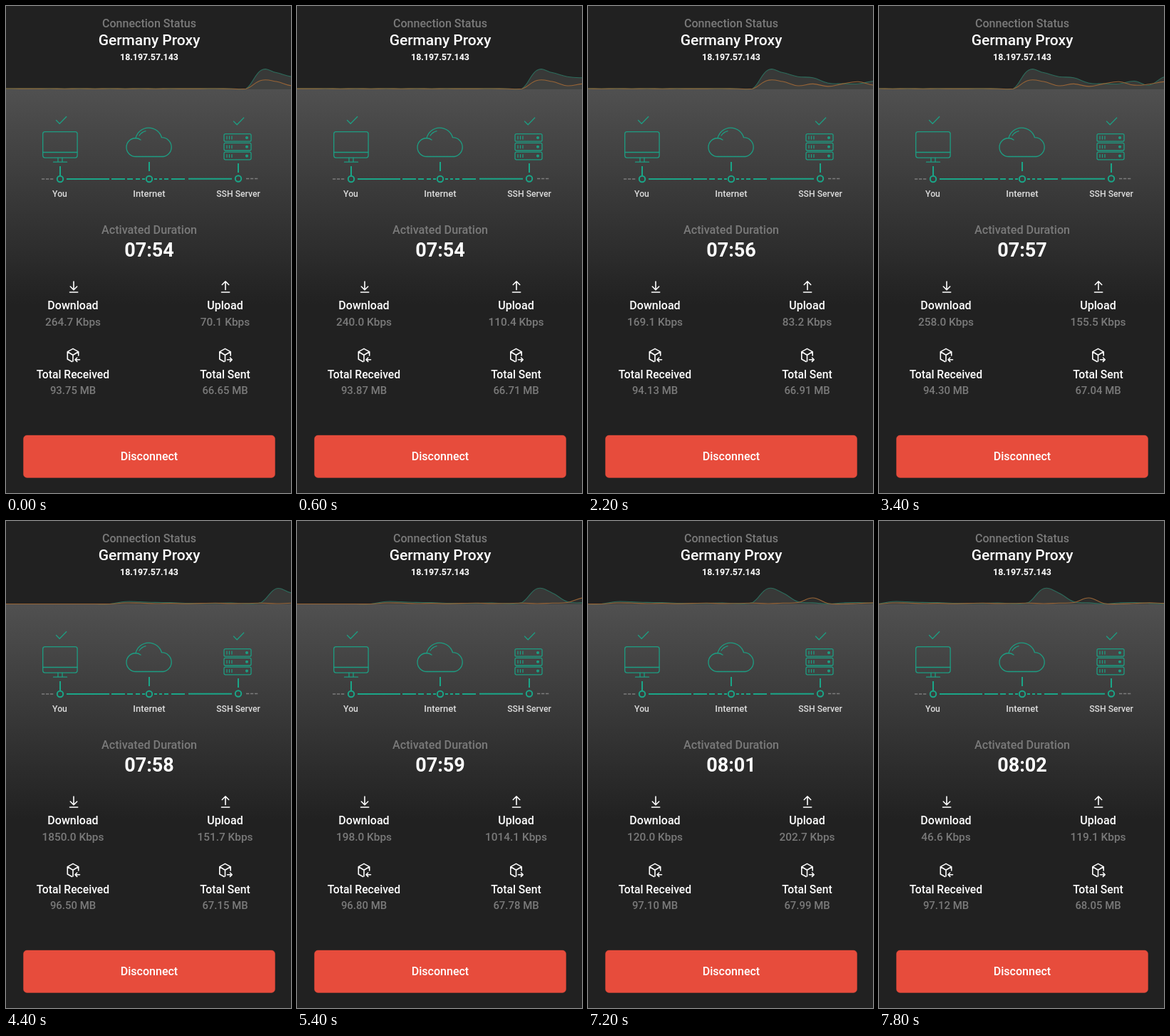
These frames come from a looping animation (400 by 684 pixels, 8000 ms). An HTML page:

```html
<!DOCTYPE html>
<html lang="en">
<head>
<meta charset="utf-8">
<title>Connection status</title>
<style>
  html, body { margin: 0; width: 100%; height: 100%; overflow: hidden; background: #212121; }
  svg { display: block; width: 100%; height: 100%; }
  text { font-family: Roboto, "Open Sans", sans-serif; font-weight: 500; font-size: 16px; text-anchor: middle; fill: #fff; }
  .dim { fill: #7a7a7a; }
  .rate { font-size: 15.4px; }
  .total { font-size: 14.9px; }
  .node { font-size: 12.2px; fill: #dcdcdc; }
  .line { fill: none; stroke-width: 1.1; stroke-linejoin: round; }
  .green { fill: none; stroke: #1d9d82; stroke-width: 1.3; stroke-linecap: round; stroke-linejoin: round; }
  .link { stroke: #1aa688; stroke-width: 2; stroke-linecap: butt; }
  .gap { stroke: #7b7b7b; stroke-width: 1.6; fill: none; }
  .icon { fill: none; stroke: #fff; stroke-width: 1.6; stroke-linecap: round; stroke-linejoin: round; }
</style>
</head>
<body>
<svg viewBox="0 0 400 684" preserveAspectRatio="none">
  <defs>
    <linearGradient id="fade" x1="0" y1="0" x2="0" y2="1">
      <stop offset="0" stop-color="#505050"/>
      <stop offset="1" stop-color="#212121"/>
    </linearGradient>
    <g id="unit">
      <rect x="306" y="179.6" width="38" height="10.6" rx="2"/>
      <path d="M310 183v4M313.5 183v4M317 183v4"/>
      <circle cx="338" cy="185" r="1.4" fill="#1d9d82"/>
    </g>
    <path id="box" d="M92.5 499.5L86.3 496V485.6L94 481.4L101.7 485.6V491M86.5 485.8L94 490.2L101.5 485.8M94 490.2V499"/>
  </defs>
  <rect width="400" height="684" fill="#212121"/>
  <rect y="117" width="400" height="303" fill="url(#fade)"/>

  <path id="downFill" fill="#8a8d8b" fill-opacity=".22"/>
  <path id="upFill" fill="#8a8580" fill-opacity=".1"/>
  <path id="downLine" class="line" stroke="#2c6c5c"/>
  <path id="upLine" class="line" stroke="#986436"/>

  <text class="dim" x="201" y="30">Connection Status</text>
  <text x="201" y="54.5" style="font-size:21px">Germany Proxy</text>
  <text x="201" y="76" style="font-size:12.4px;font-weight:700">18.197.57.143</text>

  <g class="green">
    <path d="M70.5 160.5l4.7 4.7l9.5-9.7M319.5 162l4.7 4.7l9.5-9.7"/>
    <rect x="51.7" y="176.7" width="48.4" height="36.4" rx="3"/>
    <path d="M52 205.5H100M73 213.2V219M79 213.2V219M66.5 219.2H85.5"/>
    <path d="M182 211.5H221A13.5 13.5 0 0 0 218.5 184.7A18.9 18.9 0 0 0 182 185.5A13 13 0 0 0 182 211.5ZM182 185.5Q186 185.7 189 188M187 182Q190.5 177 196 175.7"/>
    <use href="#unit"/>
    <use href="#unit" y="12.8"/>
    <use href="#unit" y="25.6"/>
  </g>
  <g class="green link">
    <path d="M76 225V238M201 219V232M326 221V234"/>
    <circle cx="76" cy="243" r="4.2"/>
    <circle cx="201" cy="243" r="4.2"/>
    <circle cx="326" cy="242.5" r="4.2"/>
    <path d="M85 243H145M148 243H167M170 243H178M182 243H188M191 243H195M208 243H212M215 243H219M222 243H228M232 243H251M256 242.7H317"/>
  </g>
  <path class="gap" d="M50 243h4.3m1.7 0h4.3m1.7 0h4.3M337 242.5h4.3m1.7 0h4.3m1.7 0h4.3"/>
  <text class="node" x="75.5" y="268">You</text>
  <text class="node" x="201" y="268" style="font-size:13px">Internet</text>
  <text class="node" x="326" y="268">SSH Server</text>

  <text class="dim" x="201" y="320" style="font-size:16.2px">Activated Duration</text>
  <text id="clock" x="201" y="352.3" style="font-size:27px;font-weight:700"></text>

  <g class="icon">
    <path d="M95 387V398.5M90.3 394L95 398.7L99.7 394M89.5 402H100.7"/>
    <path d="M308 398.5V387M303.3 391.5L308 386.8L312.7 391.5M302.5 402H313.7"/>
    <use href="#box"/>
    <path d="M103.5 496.7H97.2M99.7 494L97 496.7L99.7 499.4"/>
    <use href="#box" x="213.5"/>
    <path d="M310.5 496.7H317M314.5 494L317.2 496.7L314.5 499.4"/>
  </g>
  <text x="94" y="426">Download</text>
  <text x="307.5" y="426">Upload</text>
  <text id="downRate" class="dim rate" x="94" y="448.5"></text>
  <text id="upRate" class="dim rate" x="307.5" y="448.5"></text>
  <text x="94" y="522.5" style="font-size:15.7px">Total Received</text>
  <text x="307.5" y="522.5" style="font-size:15.7px">Total Sent</text>
  <text id="received" class="dim total" x="94" y="545"></text>
  <text id="sent" class="dim total" x="307.5" y="545"></text>

  <rect x="24.5" y="603" width="353" height="59.5" rx="5" fill="#e74c3c" stroke="#e74c3c" stroke-opacity=".4"/>
  <text x="201" y="638">Disconnect</text>
</svg>
<script>
  const LOOP = 8000, FRAME = 200, TICK = 500;
  const BASE = 116.6, STEP = 21.2, RIGHT = 400.5, POINTS = 22;
  const START = 474; // clock at the first tick, in seconds

  // KB per second; the first three entries of each list come before tick 0
  const LEAD = 3;
  const down = [6, 402, 350, 264.7, 240, 126.2, 113.8, 110.9, 169.1, 82, 258,
    2560, 1850, 392, 198, 23.8, 196.2, 253.4, 120, 46.6];
  const up = [6, 185, 160, 70.1, 110.4, 56.4, 113.2, 156.8, 83.2, 104.5, 155.5,
    64.2, 151.7, 250, 1014.1, 104.5, 15.5, 98.2, 202.7, 119.1];

  const $ = id => document.getElementById(id);
  const idle = i => 5 + 5 * Math.sin(i * 1.7) ** 2;
  const value = (list, i) => i < -LEAD ? idle(i) : list[i + LEAD];
  const total = (list, from, n) =>
    from + list.slice(LEAD + 1, LEAD + 1 + n).reduce((a, b) => a + b, 0) * TICK / 1e6;

  // Smooth curve through the samples, kept from dipping under the base line
  function curve(list, n, scale) {
    const pts = [];
    for (let i = n - POINTS; i <= n; i++) {
      pts.push([RIGHT - (n - i) * STEP, BASE - value(list, i) / scale]);
    }
    const at = i => pts[Math.max(0, Math.min(pts.length - 1, i))];
    const handle = (i, side) => {
      const a = at(i - 1), p = at(i), b = at(i + 1);
      const y = p[1] + side * 0.19 * (b[1] - a[1]);
      return [p[0] + side * STEP * 0.4, Math.min(BASE + 0.8, y)];
    };
    let d = "M" + pts[0];
    for (let i = 1; i < pts.length; i++) {
      d += "C" + [handle(i - 1, 1), handle(i, -1), pts[i]].join(" ");
    }
    return d;
  }

  function plot(name, list, n, scale) {
    const d = curve(list, n, scale);
    $(name + "Line").setAttribute("d", d);
    $(name + "Fill").setAttribute("d", `${d}V117H-80Z`);
    $(name + "Rate").textContent = value(list, n).toFixed(1) + " Kbps";
  }

  function show(n) {
    const scale = n < 8 ? 15.2 : 118; // the axis grows when the burst arrives
    plot("down", down, n, scale);
    plot("up", up, n, scale);
    $("received").textContent = total(down, 93.75, n).toFixed(2) + " MB";
    $("sent").textContent = total(up, 66.65, n).toFixed(2) + " MB";
    const s = START + Math.floor(n / 2);
    const two = v => String(v).padStart(2, "0");
    $("clock").textContent = two(Math.floor(s / 60)) + ":" + two(s % 60);
  }

  let shown = -1;
  const begin = performance.now();
  function draw() {
    const t = (performance.now() - begin) % LOOP;
    const snapped = Math.floor(t / FRAME) * FRAME;
    const n = Math.floor((snapped - FRAME) / TICK) + 1;
    if (n !== shown) show(shown = n);
    requestAnimationFrame(draw);
  }
  draw();
</script>
</body>
</html>
```
